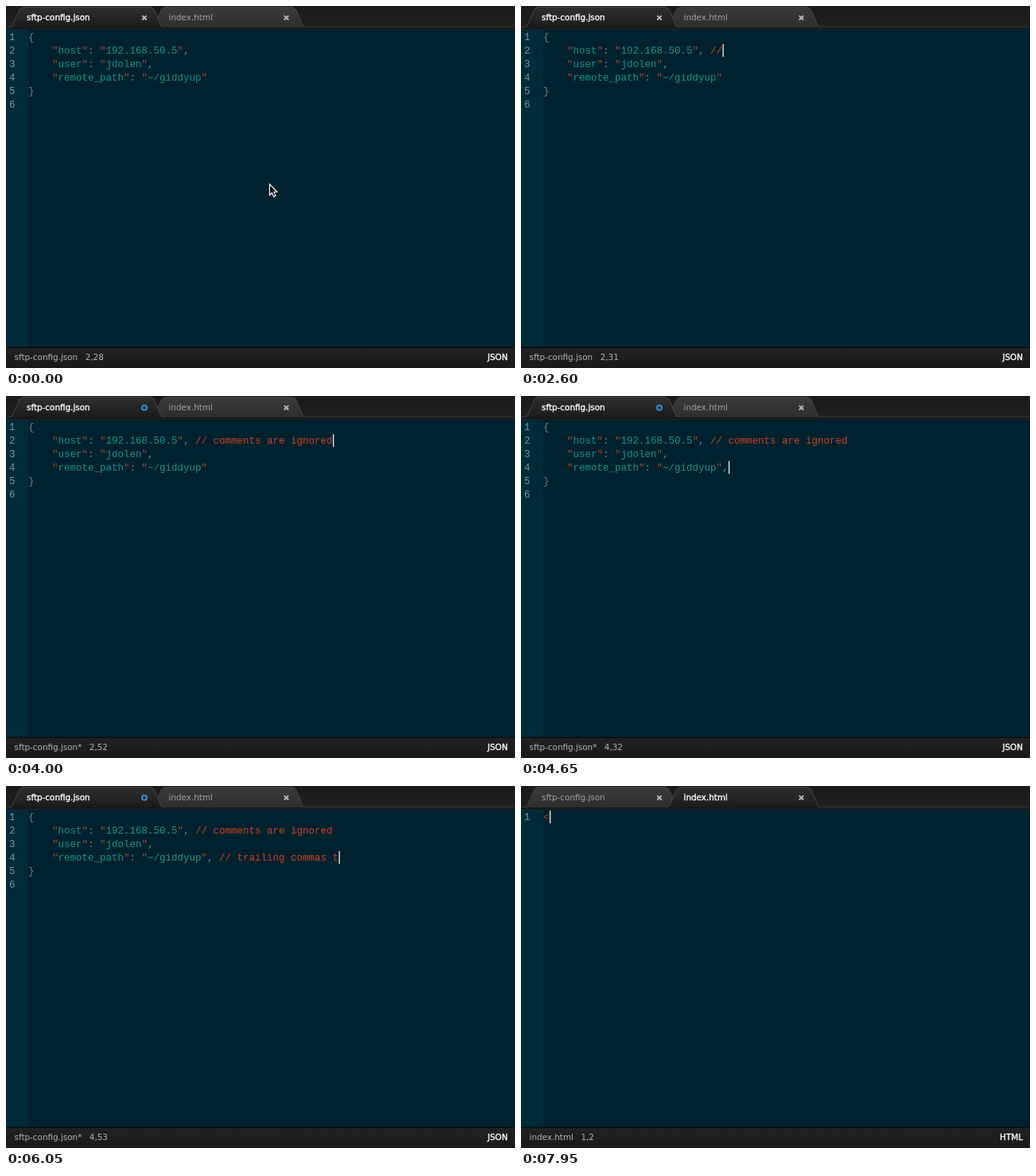
These frames come from a looping animation (640 by 456 pixels, 8000 ms). An HTML page with a canvas:

```html
<!DOCTYPE html>
<html lang="en">
<head>
<meta charset="utf-8">
<title>Editor</title>
<style>
html, body { margin: 0; width: 100%; height: 100%; overflow: hidden; background: #00222f; }
canvas { display: block; width: 640px; height: 456px; }
</style>
</head>
<body>
<canvas id="stage" width="640" height="456"></canvas>
<script>
const canvas = document.getElementById('stage');
const ctx = canvas.getContext('2d');
const LOOP = 8000, SAVE = 7100, SWITCH = 7500;
const LEFT = 28, CHAR = 7.5, ROW = 17;
const CODE_FONT = '12.5px "Liberation Mono", monospace';
const UI_FONT = '10.4px "DejaVu Sans", sans-serif';
const COLOR = { plain: '#67858b', string: '#1a938f', quote: '#a8442f', comment: '#cb4122' };

const ROWS = [
  '{',
  '    "host": "192.168.50.5",',
  '    "user": "jdolen",',
  '    "remote_path": "~/giddyup"',
  '}',
  ''
];
const NOTE_1 = ' // comments are ignored';
const NOTE_2 = ', // trailing commas too';

// [time, characters typed]
const KEYS_1 = [[2400, 0], [2550, 3], [2650, 3], [3950, 24]];
const KEYS_2 = [[4550, 0], [4600, 1], [4850, 1], [5290, 10], [6150, 24]];
const CARET_OFF = [[6400, 6650], [6900, 7100], [7400, 7500], [7650, 7850]];

function track(keys, t) {
  if (t <= keys[0][0]) return keys[0][1];
  for (let i = 1; i < keys.length; i++) {
    const [t0, v0] = keys[i - 1], [t1, v1] = keys[i];
    if (t < t1) return v0 + (v1 - v0) * (t - t0) / (t1 - t0);
  }
  return keys[keys.length - 1][1];
}

const typed = (text, keys, t) => text.slice(0, Math.floor(track(keys, t) + 0.001));

function rect(x, y, w, h, fill) {
  ctx.fillStyle = fill;
  ctx.fillRect(x, y, w, h);
}

function gradient(x0, y0, x1, y1, ...colors) {
  const g = ctx.createLinearGradient(x0, y0, x1, y1);
  colors.forEach((c, i) => g.addColorStop(i / (colors.length - 1), c));
  return g;
}

function path(points, close) {
  ctx.beginPath();
  points.forEach(([x, y]) => ctx.lineTo(x, y));
  if (close) ctx.closePath();
}

function label(text, x, y, color, strong, align = 'left') {
  ctx.font = UI_FONT;
  ctx.textAlign = align;
  ctx.fillStyle = color;
  ctx.fillText(text, x, y);
  if (strong) {
    ctx.strokeStyle = color;
    ctx.lineWidth = 0.35;
    ctx.strokeText(text, x, y);
  }
  ctx.textAlign = 'left';
}

function code(text, col, row, color) {
  ctx.font = CODE_FONT;
  ctx.fillStyle = color;
  ctx.fillText(text, LEFT + col * CHAR, 43 + row * ROW);
}

function codeRow(text, row) {
  let inside = false, col = 0;
  for (const part of text.match(/"|[^"]+/g) || []) {
    const isQuote = part === '"';
    code(part, col, row, isQuote ? COLOR.quote : inside ? COLOR.string : COLOR.plain);
    if (isQuote) inside = !inside;
    col += part.length;
  }
}

function note(text, col, row) {
  const start = text.indexOf('/');
  const head = start < 0 ? text : text.slice(0, start);
  code(head, col, row, COLOR.plain);
  if (start >= 0) code(text.slice(start), col + start, row, COLOR.comment);
}

function tab(x, w, name, active, dirty) {
  const edge = [[x - 1, 27], [x + 2, 25], [x + 11, 4], [x + 15, 1.5],
    [x + w - 15, 1.5], [x + w - 11, 4], [x + w - 2, 25], [x + w + 1, 27]];
  path(edge, true);
  ctx.fillStyle = active ? gradient(0, 1, 0, 28, '#303030', '#1a1a1a')
    : gradient(0, 1, 0, 28, '#3b3b3b', '#2d2d2d');
  ctx.fill();
  path(edge);
  ctx.strokeStyle = active ? '#454545' : '#424242';
  ctx.lineWidth = 1;
  ctx.stroke();
  label(name, x + 20, 17.5, active ? '#fff' : '#a3a3a3', active);

  const cx = x + 168, cy = 14.8;
  ctx.beginPath();
  if (dirty) {
    ctx.arc(cx, cy, 3, 0, Math.PI * 2);
    ctx.strokeStyle = '#2790dc';
  } else {
    for (const d of [-1, 1]) {
      ctx.moveTo(cx - 2.7, cy - 2.7 * d);
      ctx.lineTo(cx + 2.7, cy + 2.7 * d);
    }
    ctx.strokeStyle = '#b9b9b9';
  }
  ctx.lineWidth = 2;
  ctx.stroke();
}

function pointer(x, y) {
  ctx.save();
  ctx.translate(x, y);
  path([[0.5, 0.5], [0.5, 14], [3.4, 11.2], [5.6, 16.3], [8, 15.3], [5.8, 10.3], [9.8, 10]], true);
  ctx.fillStyle = '#000';
  ctx.fill();
  ctx.strokeStyle = '#fff';
  ctx.lineWidth = 1.2;
  ctx.stroke();
  ctx.restore();
}

function drawPointer(t) {
  if (t < 650) {
    const p = Math.max(0, t - 50) / 600;
    pointer(331 + 12 * p * p, 224 + 16 * p * p);
  } else if (t >= 1650 && t < 2250) {
    const p = (t - 1650) / 600;
    const y = 240 + 216 * p;
    if (y > 430) pointer(343 + 285 * p, y);
  }
}

function caretAt(t, first, second) {
  if (t >= SWITCH) return [t >= 7850 ? 1 : 0, 0];
  if (t >= 4300) return [ROWS[3].length + second.length, 3];
  if (t >= 4200) return [ROWS[2].length, 2];
  return [ROWS[1].length + first.length, 1];
}

function caretVisible(t) {
  if (t < 2400) return t >= 150 && (t - 150) % 500 < 250;
  return !CARET_OFF.some(([a, b]) => t >= a && t < b);
}

function chrome(html, dirty) {
  rect(0, 0, 640, 30, gradient(0, 0, 0, 28, '#1a1a1a', '#202020'));
  rect(0, 26, 640, 1, '#363636');
  rect(0, 27, 640, 2, '#151515');
  const json = () => tab(6, 191, 'sftp-config.json', !html, dirty);
  const page = () => tab(184.5, 191, 'index.html', html, false);
  if (html) { json(); page(); } else { page(); json(); }
  rect(0, 28, 640, 1, '#171b1d');
}

function statusBar(name, row, col, syntax) {
  rect(0, 430, 640, 26, gradient(0, 431, 0, 456, '#222224', '#18191b'));
  rect(0, 429.5, 640, 1.5, '#0b0e10');
  label(name, 10.5, 446, '#b4b4b4');
  const x = 10.5 + ctx.measureText(name).width + 9.5;
  label(`${row + 1},${col + 1}`, x, 446, '#b4b4b4');
  label(syntax, 631, 446, '#fff', true, 'right');
}

function draw(t) {
  const html = t >= SWITCH;
  const dirty = t >= 2650 && t < SAVE;
  const first = typed(NOTE_1, KEYS_1, t);
  const second = typed(NOTE_2, KEYS_2, t);
  const [col, row] = caretAt(t, first, second);

  rect(0, 0, 640, 456, '#00222f');
  rect(0, 29, 28, 401, '#002b3a');
  chrome(html, dirty);

  const rows = html ? [''] : ROWS;
  rows.forEach((text, i) => {
    code(String(i + 1), -3.2, i, '#7f9498');
    codeRow(text, i);
  });
  if (html) {
    if (col) code('<', 0, 0, COLOR.quote);
  } else {
    note(first, ROWS[1].length, 1);
    note(second, ROWS[3].length, 3);
  }
  if (caretVisible(t)) rect(LEFT + col * CHAR + 0.5, 31 + row * ROW, 1.3, 16, '#f2f2f2');

  statusBar(html ? 'index.html' : 'sftp-config.json' + (dirty ? '*' : ''), row, col, html ? 'HTML' : 'JSON');
  drawPointer(t);
}

const start = performance.now();
function tick() {
  draw((performance.now() - start) % LOOP);
  requestAnimationFrame(tick);
}
tick();
</script>
</body>
</html>
```
